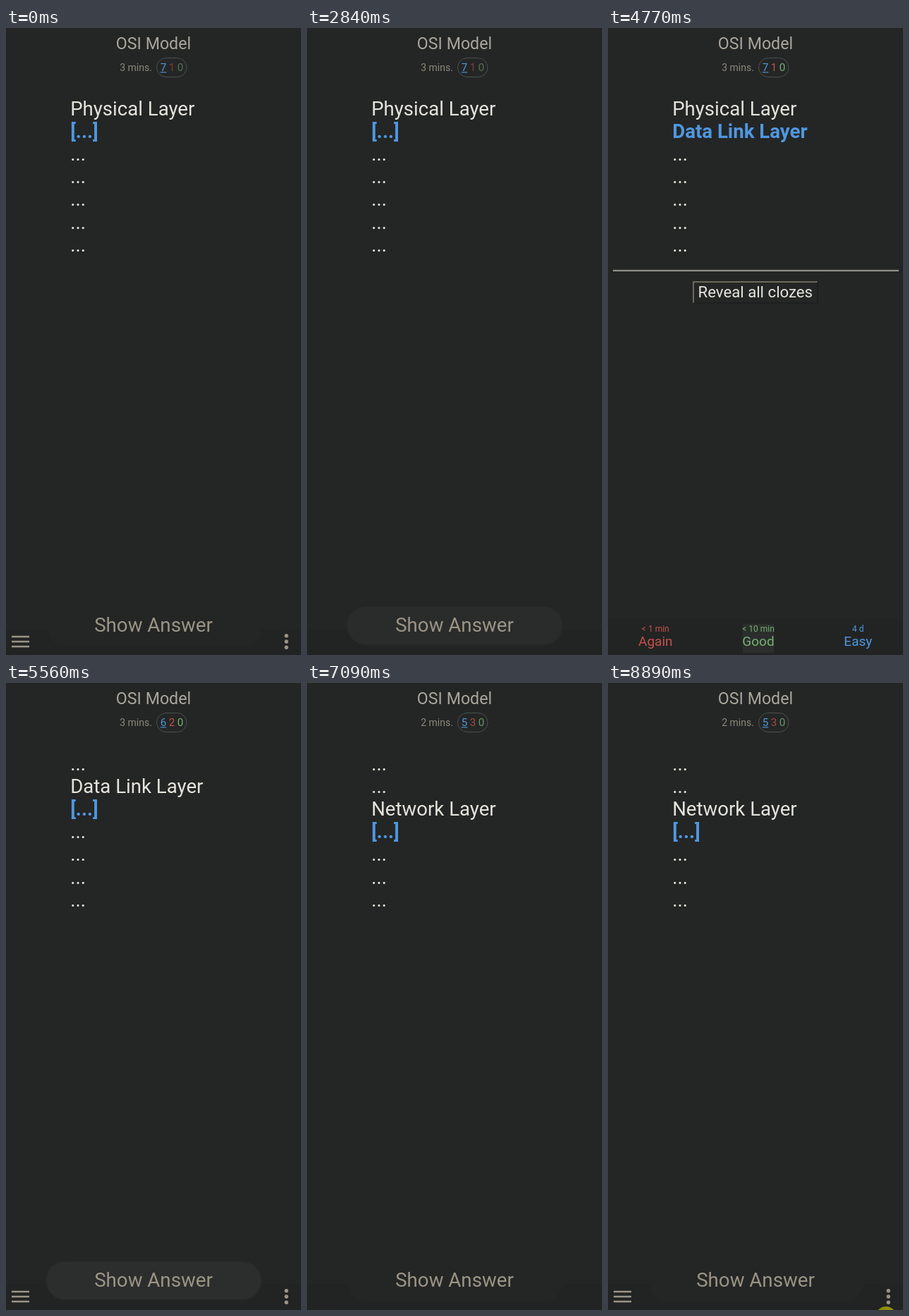
An HTML page that plays this animation: 418 px wide and 889 px high, repeating every 9.1 s.

```html
<!DOCTYPE html>
<html lang="en">
<head>
<meta charset="utf-8">
<title>OSI Model</title>
<style>
  html, body { margin: 0; width: 100%; height: 100%; overflow: hidden; background: #242625; }
  svg { display: block; width: 418px; height: 889px; font-family: Roboto, sans-serif; }
  .mid { text-anchor: middle; }
  .light { fill: #e5e4dc; }
  .again { fill: #c4524d; }
  .good { fill: #76b073; }
  .easy { fill: #4f97e0; }
  .tan { fill: #9b9485; }
  #lines { font-size: 27.6px; }
  .cloze { font-weight: 700; fill: #4f97e0; }
  .when { font-size: 12px; }
  .grade { font-size: 19px; }
</style>
</head>
<body>
<svg viewBox="0 0 418 889">
  <text class="mid" x="209" y="29.5" font-size="23.2" fill="#aaa69c">OSI Model</text>
  <text id="eta" x="161.2" y="61" font-size="14" fill="#8e887b"></text>
  <rect x="213.5" y="42.5" width="42.5" height="27" rx="13.5" fill="none" stroke="#465350"/>
  <g id="counts" class="mid" font-size="15.2">
    <text class="easy" x="223" y="61"></text>
    <text class="again" x="235" y="61"></text>
    <text class="good" x="247" y="61"></text>
  </g>
  <rect class="easy" x="218.7" y="62.3" width="8.6" height="1.1"/>

  <g id="lines"></g>

  <g id="reveal">
    <rect x="7" y="342.6" width="405" height="1.2" fill="#777773"/>
    <rect x="7" y="343.8" width="405" height="1.2" fill="#aaa9a5"/>
    <path d="M121 390V360H297" fill="none" stroke="#6e685d" stroke-width="2"/>
    <path d="M121 390H297V360" fill="none" stroke="#1d1f1e" stroke-width="1.5"/>
    <text class="mid light" x="208.8" y="382" font-size="22.2">Reveal all clozes</text>
  </g>

  <g id="ask">
    <path d="M0 852H58C62 868 72 877 86 877H332C348 877 359 868 363 852H418V889H0Z" fill="#222423"/>
    <rect id="pill" x="56.5" y="820.5" width="305" height="53.5" rx="26.7" fill="#2c2e2d"/>
    <text class="mid tan" x="209" y="856" font-size="27.7">Show Answer</text>
  </g>

  <g id="icons" class="tan">
    <path d="M8 863H33M8 870H33M8 877H33" stroke="#9b9485" stroke-width="2.6"/>
    <circle cx="397.3" cy="861.7" r="2.7"/>
    <circle cx="397.3" cy="870" r="2.7"/>
    <circle cx="397.3" cy="878.3" r="2.7"/>
  </g>

  <g id="grades" class="mid">
    <rect y="838" width="418" height="51" fill="#222423"/>
    <rect id="press" x="191" y="845" width="44" height="41" fill="#2b2e2c"/>
    <g class="again"><text class="when" x="67.3" y="856">&lt; 1 min</text><text class="grade" x="67.3" y="876">Again</text></g>
    <g class="good"><text class="when" x="213" y="856">&lt; 10 min</text><text class="grade" x="213" y="876">Good</text></g>
    <g class="easy"><text class="when" x="354.3" y="856">4 d</text><text class="grade" x="354.3" y="876">Easy</text></g>
  </g>

  <circle id="touch" cx="394" cy="898.6" r="14.6" fill="#918d08"/>
</svg>
<script>
const LOOP = 9100;
const layers = ['Physical', 'Data Link', 'Network'];
// Per card: start, icons in, show-answer tap, answer shown, grade tap
const cards = [
  { start: -999, icons: -500, tap: 2560, answer: 3020, grade: 4710, eta: '3 mins.', counts: '710', dim: 0.55 },
  { start: 5010, icons: 5250, tap: 5480, answer: 5920, grade: 6500, eta: '3 mins.', counts: '620', dim: 1 },
  { start: 6900, icons: 7580, tap: 1e9, answer: 1e9, grade: 1e9, eta: '2 mins.', counts: '530', dim: 0.8 }
];
const $ = id => document.getElementById(id);
const ramp = (t, from, len) => Math.min(1, Math.max(0, (t - from) / len));
const fade = (id, a) => $(id).setAttribute('opacity', a);
let shown = '';

function layLines(n, answered) {
  let html = '';
  for (let i = 0; i < 7; i++) {
    const cloze = i === n + 1;
    const open = i === n || cloze && answered;
    const text = open ? layers[i] + ' Layer' : cloze ? '[...]' : '...';
    html += `<text class="${cloze ? 'cloze' : 'light'}" x="91.2" y="${123.5 + i * 32.2}">${text}</text>`;
  }
  $('lines').innerHTML = html;
}

function draw(t) {
  const n = cards.filter(c => t >= c.start).length - 1;
  const c = cards[n];
  const answered = t >= c.answer;
  const key = n + '/' + answered;
  if (key !== shown) {
    shown = key;
    layLines(n, answered);
    $('eta').textContent = c.eta;
    [...$('counts').children].forEach((el, i) => {
      el.textContent = c.counts[i];
      el.setAttribute('opacity', i && !answered ? c.dim : 1);
    });
  }
  fade('reveal', +answered);
  fade('ask', answered ? 0 : ramp(t, c.start - 30, 120));
  fade('pill', t >= c.tap ? 1 - ramp(t, c.tap + 240, 200) : 0);
  fade('icons', ramp(t, c.icons, 80) * (1 - ramp(t, c.tap + 120, 120)));
  fade('grades', answered ? ramp(t, c.answer - 30, 120) : 0);
  fade('press', t >= c.grade ? 1 - ramp(t, c.grade + 180, 90) : 0);
  fade('touch', +(t >= 8890));
}

const t0 = performance.now();
function tick() {
  draw((performance.now() - t0) % LOOP);
  requestAnimationFrame(tick);
}
tick();
</script>
</body>
</html>
```
